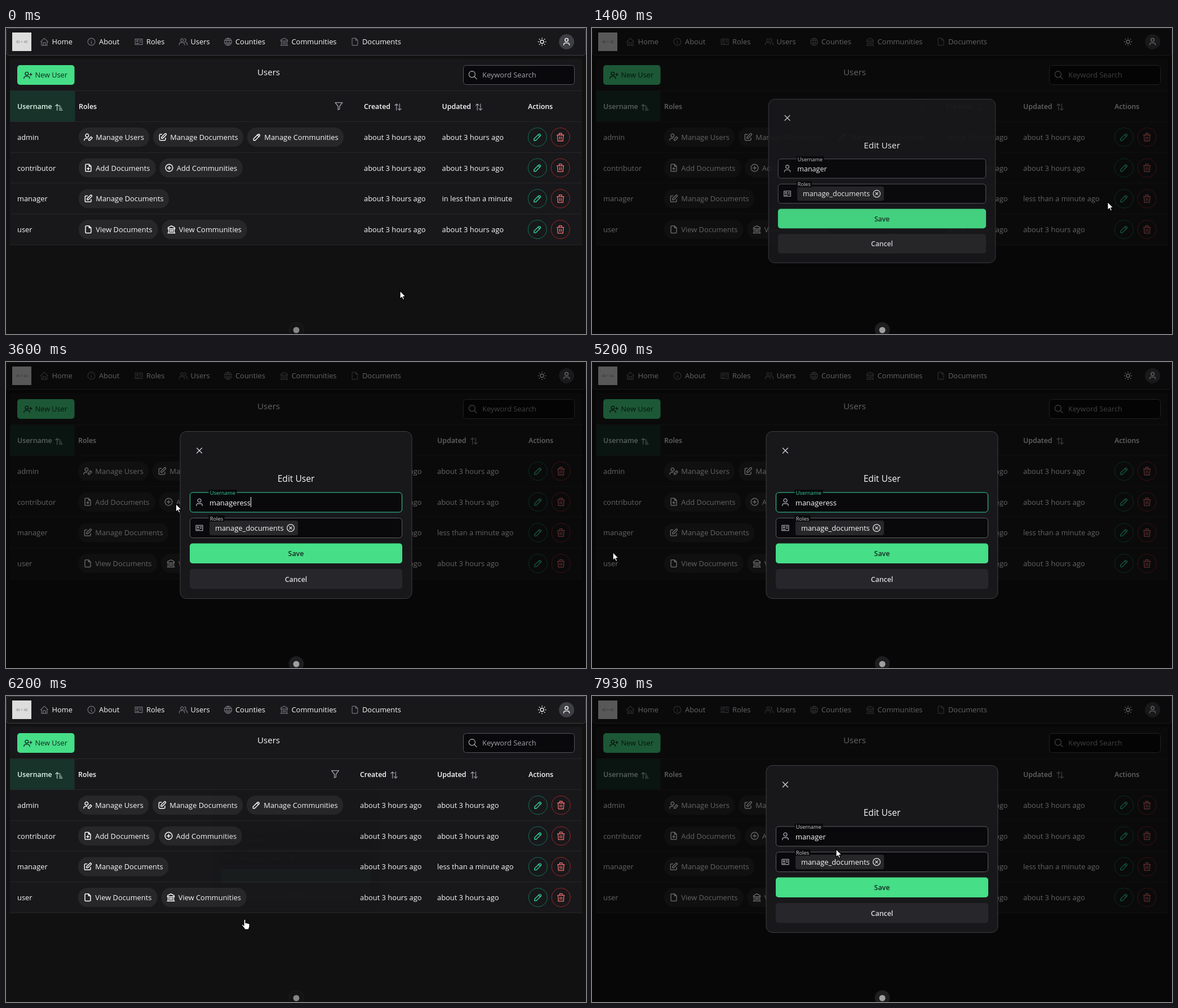
An HTML page with a canvas that plays this animation: 1029 px wide and 544 px high, repeating every 8 s.

```html
<!DOCTYPE html>
<html lang="en">
<head>
<meta charset="utf-8">
<title>Users</title>
<style>
html, body { margin: 0; width: 100%; height: 100%; overflow: hidden; background: #111; }
canvas { display: block; width: 1029px; height: 544px; }
</style>
</head>
<body>
<canvas id="stage"></canvas>
<script>
const W = 1029, H = 544, LOOP = 8000;
const canvas = document.getElementById('stage');
const dpr = window.devicePixelRatio || 1;
canvas.width = W * dpr;
canvas.height = H * dpr;
const ctx = canvas.getContext('2d');

const GREEN = '#46de87', MINT = '#34d399', WHITE = '#fafafa', MUTED = '#a1a1aa';
const PANEL = '#18181b', LINE = '#27272a', EDGE = '#3f3f46', FIELD = '#09090b';

// Outline icons on a 24-unit grid
const ring = (x, y, r) => `M${x - r} ${y}a${r} ${r} 0 1 0 ${2 * r} 0a${r} ${r} 0 1 0 ${-2 * r} 0`;
const sheet = 'M14 3v5h5M17 21H7a2 2 0 0 1-2-2V5a2 2 0 0 1 2-2h7l5 5v11a2 2 0 0 1-2 2z';
const icons = {
  home: 'M5 12H3l9-9 9 9h-2M5 12v9h14v-9M9 21v-7h6v7',
  info: ring(12, 12, 9) + 'M12 8v.5M11 12h1v4h1',
  card: 'M3 5h18v14H3z' + ring(8.5, 10, 2) + 'M14 9h4M14 13h4M6 16h6',
  group: ring(9, 8, 3.5) + 'M2 20v-2a4 4 0 0 1 4-4h5a4 4 0 0 1 4 4v2M15 4.500a3.500 3.500 0 0 1 0 7M22 20v-2a4 4 0 0 0-4-4',
  globe: ring(12, 12, 9) + 'M3.600 9h17M3.600 15h17M11.500 3a17 17 0 0 0 0 18M12.500 3a17 17 0 0 1 0 18',
  bank: 'M3 21h18M3 10h18M4 7l8-4 8 4v3M4 10V7M5 10v11M19 10v11M9 13v5M12 13v5M15 13v5',
  file: sheet,
  fileAdd: sheet + 'M12 11v6M9 14h6',
  sun: ring(12, 12, 4) + 'M3 12h1M12 3v1M20 12h1M12 20v1M5.600 5.600l.7.7M18.400 5.600l-.7.7M17.700 17.700l.7.7M6.300 17.700l-.7.7',
  user: ring(12, 7.5, 4) + 'M5 20v-1a4 4 0 0 1 4-4h6a4 4 0 0 1 4 4v1',
  userAdd: ring(9, 8, 4) + 'M2 20v-1a4 4 0 0 1 4-4h6a4 4 0 0 1 4 4v1M16 10h6M19 7v6',
  userEdit: ring(9, 8, 4) + 'M2 20v-1a4 4 0 0 1 4-4h4M13 20v-3l6-6 3 3-6 6z',
  pencil: 'M4 20h4L18.500 9.500a2.800 2.800 0 1 0-4-4L4 16zM13.500 6.500l4 4',
  edit: 'M10 5H6a2 2 0 0 0-2 2v11a2 2 0 0 0 2 2h11a2 2 0 0 0 2-2v-4M20.400 6.600a2.100 2.100 0 0 0-3-3L9 12v3h3z',
  plus: ring(12, 12, 9) + 'M8 12h8M12 8v8',
  trash: 'M4 7h16M10 11v6M14 11v6M5 7l1 14h12l1-14M9 7V3h6v4',
  search: ring(10.5, 10.5, 7) + 'M21 21l-5.500-5.500',
  funnel: 'M3 3h18l-7 9v7l-4 2v-9z',
  sort: 'M8 20V4M4 8l4-4 4 4M16 4v16M12 16l4 4 4-4',
  sortUp: 'M7 21V5M3 9l4-4 4 4M13 8h2M13 12h4M13 16h6M13 20h8',
  cross: 'M6 6l12 12M18 6L6 18',
  clear: ring(12, 12, 9) + 'M9 9l6 6M15 9l-6 6'
};
for (const k in icons) icons[k] = new Path2D(icons[k]);

const arrow = new Path2D('M0 0V14.500L3.300 11.600 5.400 16.400 7.800 15.300 5.700 10.700H10.200z');
const hand = new Path2D('M-1.500 1.500a1.500 1.500 0 0 1 3 0V6.500q1.400-1 2.600.4 1.500-.9 2.500.6 2-.4 2 1.500V13q-.2 2-1.200 3v2H-.5v-1.500Q-3 13.500-5 10.500q-.5-2 1.300-1.800L-1.500 11z');

const clamp = v => Math.max(0, Math.min(1, v));
const ramp = (t, a, b) => clamp((t - a) / (b - a));
const mix = (a, b, p) => a + (b - a) * p;

// cubic-bezier(0, 0, .2, 1)
function easeOut(x) {
  let lo = 0, hi = 1;
  for (let i = 0; i < 20; i++) {
    const s = (lo + hi) / 2;
    if (0.6 * s * s * (1 - s) + s * s * s < x) lo = s; else hi = s;
  }
  return lo * lo * (3 - 2 * lo);
}

function text(s, x, y, size = 12.86, color = WHITE, weight = 400, align = 'left') {
  ctx.font = `${weight} ${size}px "Open Sans", "Noto Sans", sans-serif`;
  ctx.textAlign = align;
  ctx.fillStyle = color;
  ctx.fillText(s, x, y);
}

function icon(name, x, y, size, color, width = 1.3) {
  const k = size / 24;
  ctx.save();
  ctx.translate(x - size / 2, y - size / 2);
  ctx.scale(k, k);
  ctx.strokeStyle = color;
  ctx.lineWidth = width / k;
  ctx.lineCap = ctx.lineJoin = 'round';
  ctx.stroke(icons[name]);
  ctx.restore();
}

function box(x, y, w, h, r, fill, stroke) {
  ctx.beginPath();
  ctx.roundRect(x, y, w, h, r);
  if (fill) { ctx.fillStyle = fill; ctx.fill(); }
  if (stroke) { ctx.strokeStyle = stroke; ctx.lineWidth = 1; ctx.stroke(); }
}

function disc(x, y, r, fill, stroke) {
  box(x - r, y - r, 2 * r, 2 * r, r, fill, stroke);
}

const nav = [
  ['home', 68, 'Home', 81.5], ['info', 151.5, 'About', 165], ['card', 235.5, 'Roles', 249],
  ['group', 314.5, 'Users', 327.5], ['globe', 394, 'Counties', 407],
  ['bank', 493.5, 'Communities', 506.5], ['file', 619, 'Documents', 632]
];

// Each chip: icon, label, width
const rows = [
  ['admin', [['userEdit', 'Manage Users', 125], ['edit', 'Manage Documents', 160], ['pencil', 'Manage Communities', 171]]],
  ['contributor', [['fileAdd', 'Add Documents', 136.5], ['plus', 'Add Communities', 147]]],
  ['manager', [['edit', 'Manage Documents', 160]]],
  ['user', [['file', 'View Documents', 140.5], ['bank', 'View Communities', 151]]]
];

function drawNav() {
  box(0.5, 0.5, 1028, 48, 5, PANEL, EDGE);
  ctx.fillStyle = '#dddddd';
  ctx.fillRect(11, 8, 34, 33);
  text('40 × 40', 28, 27, 6.3, '#999', 600, 'center');
  for (const [name, ix, label, tx] of nav) {
    icon(name, ix, 24.5, 17, '#71717a', 1.2);
    text(label, tx, 29.3);
  }
  icon('sun', 951, 24.5, 18, WHITE);
  disc(994.5, 24.5, 13.5, EDGE);
  icon('user', 994.5, 24.5, 17, WHITE, 1.4);
}

function drawTable(fresh, hover) {
  const col = fresh
    ? { roles: 128, funnel: 584, made: 628, upd: 765, act: 927 }
    : { roles: 129, funnel: 590.5, made: 635, upd: 773.5, act: 926 };
  ctx.fillStyle = PANEL;
  ctx.fillRect(7, 55, 1015, 330);

  box(20, 66, 101.5, 35, 5, GREEN);
  icon('userAdd', 39, 84, 17, '#15281e', 1.4);
  text('New User', 51.5, 88.3, 12.75, '#15281e', 500);
  text('Users', 466, 84, 15.1, WHITE, 400, 'center');
  box(811.5, 66.5, 197, 34, 5, FIELD, '#52525b');
  icon('search', 828, 83.5, 19, MUTED);
  text('Keyword Search', 845, 88.3, 12.86, MUTED);

  ctx.fillStyle = '#18332a';
  ctx.fillRect(7, 112, col.roles - 14 + 0.5, 54);
  const head = (s, x) => text(s, x, 144.2, 12.4, WHITE, 600);
  text('Username', 20, 144.2, 12.4, '#dff5ea', 600);
  icon('sortUp', 94, 140.5, 16, '#c3dbd0', 1.2);
  head('Roles', col.roles);
  icon('funnel', col.funnel, 139, 17, MUTED);
  head('Created', col.made);
  icon('sort', col.made + 60.5, 140.5, 17, MUTED, 1.2);
  head('Updated', col.upd);
  icon('sort', col.upd + 65.5, 140.5, 17, MUTED, 1.2);
  head('Actions', col.act);

  ctx.fillStyle = LINE;
  for (let i = 0; i < 6; i++) ctx.fillRect(7, Math.round(111 + i * 54.8), 1015, 1);

  rows.forEach(([name, chips], i) => {
    const y = 194 + i * 54.7, base = y + 4.8;
    text(name, 20, base);
    let x = col.roles;
    for (const [glyph, label, w] of chips) {
      box(x, y - 17, w, 34, 16, LINE);
      icon(glyph, x + 17, y, 17, WHITE, 1.5);
      text(label, x + 30.3, base);
      x += w + 7;
    }
    text('about 3 hours ago', col.made, base);
    const recent = fresh ? 'less than a minute ago' : 'in less than a minute';
    text(i === 2 ? recent : 'about 3 hours ago', col.upd, base);
    const bx = col.act + 16.8;
    disc(bx, y, 16.5, i === 2 ? `rgba(52,211,153,${0.16 * hover})` : null, '#12734f');
    icon('pencil', bx, y, 18, MINT, 1.4);
    disc(bx + 40.8, y, 16.5, null, '#a12626');
    icon('trash', bx + 40.8, y, 18, '#f87171', 1.3);
  });
}

function drawLabel(s, y, w, color) {
  ctx.fillStyle = FIELD;
  ctx.fillRect(359.5, y - 5, w, 11);
  text(s, 361.7, y + 4, 9.35, color);
}

function drawDialog(t, show) {
  if (show <= 0) return;
  const reopened = t > 7000;
  const focus = reopened ? 0 : ramp(t, 2070, 2270) - ramp(t, 5570, 5670);
  const tint = (a, b) => `rgb(${a.map((v, i) => Math.round(mix(v, b[i], focus)))})`;
  const mint = [52, 211, 153];
  const k = mix(0.7, 1, show);

  ctx.save();
  ctx.globalAlpha = show;
  ctx.translate(514.5, 272);
  ctx.scale(k, k);
  ctx.translate(-514.5, -272);

  box(309, 123.5, 411, 297, 11, PANEL, EDGE);
  icon('cross', 343, 157.5, 18, '#d4d4d8', 1.3);
  text('Edit User', 514.5, 213, 15.6, WHITE, 400, 'center');

  box(326.5, 232, 376, 35, 5, FIELD, tint([90, 90, 98], mint));
  icon('user', 343, 249.5, 18, MUTED, 1.4);
  drawLabel('Username', 232, 50, tint([212, 212, 216], mint));
  const typed = reopened ? 0 : [2870, 3070, 3270].filter(m => t >= m).length;
  const value = 'manager' + 'ess'.slice(0, typed);
  text(value, 361, 254.6);
  const blink = t < 2870 ? t < 2670 : t < 3270 || Math.floor((t - 3270) / 500) % 2 === 0;
  if (!reopened && t >= 2150 && t < 5570 && blink) {
    const cx = Math.round(361 + ctx.measureText(value).width);
    ctx.fillRect(cx, 240, 1, 18);
  }

  box(326.5, 277.5, 376, 35, 5, FIELD, '#5a5a62');
  icon('card', 343, 295, 16, MUTED, 1.3);
  box(361, 282, 157, 26, 4, LINE);
  drawLabel('Roles', 277.5, 28, '#d4d4d8');
  text('manage_documents', 371, 299.7);
  icon('clear', 505, 295, 17, '#e4e4e7', 1.3);

  box(326, 322.5, 377, 35.5, 5, GREEN);
  text('Save', 514.5, 345.3, 12.4, '#15281e', 600, 'center');
  const hot = reopened ? 0 : ramp(t, 5560, 5650);
  const press = !reopened && t >= 5930 ? 14 : 0;
  const shade = Math.round(mix(39, 63, hot)) + press;
  box(326, 368, 377, 35.5, 5, `rgb(${shade},${shade},${shade + 4})`);
  text('Cancel', 514.5, 390.6, 12.4, '#d9d9de', 600, 'center');
  ctx.restore();
}

// Pointer way-points: time, x, y
const path = [
  [0, 699, 467], [70, 699, 467], [870, 945, 345], [930, 944, 309], [1200, 944, 309],
  [1400, 915, 309], [2000, 560, 250], [2130, 556, 250], [2330, 531, 416], [2870, 531, 416],
  [3270, 530, 300], [3600, 302, 252], [4070, 27, 315], [4500, 20, 320], [4930, 24, 321],
  [5200, 37, 338], [5670, 423.5, 397], [6470, 423.5, 397], [7210, 944, 308],
  [7290, 944, 308], [7930, 433, 272], [8000, 433, 272]
];

function slope(i, c) {
  if (i < 1 || i > path.length - 2) return 0;
  const [p, q, r] = [path[i - 1], path[i], path[i + 1]];
  const a = (q[c] - p[c]) / (q[0] - p[0]), b = (r[c] - q[c]) / (r[0] - q[0]);
  return a * b > 0 ? 2 * a * b / (a + b) : 0;
}

function pointerAt(t) {
  let i = 0;
  while (i < path.length - 2 && path[i + 1][0] <= t) i++;
  const a = path[i], b = path[i + 1], d = b[0] - a[0], s = (t - a[0]) / d;
  const e = s * s * (3 - 2 * s);
  return [1, 2].map(c => mix(a[c], b[c], e)
    + d * s * (1 - s) * ((1 - s) * slope(i, c) - s * slope(i + 1, c)));
}

function drawPointer(t) {
  if (t >= 2870 && t < 3270) return;
  const [x, y] = pointerAt(t);
  const onEdit = (t >= 900 && t < 1200) || (t >= 7150 && t < 7260);
  const onCancel = t >= 5560 && t < 6500;
  const onField = t > 1450 && t < 5600 && x > 326 && x < 703 && y > 232 && y < 267;
  ctx.save();
  ctx.translate(x, y);
  ctx.fillStyle = '#fff';
  if (onField) {
    ctx.fillRect(-0.5, -7, 1, 15);
    ctx.fillRect(-3, -8, 6, 1);
    ctx.fillRect(-3, 8, 6, 1);
  } else {
    const shape = onEdit || onCancel ? hand : arrow;
    ctx.strokeStyle = '#000';
    ctx.lineWidth = 1.2;
    ctx.lineJoin = 'round';
    ctx.fill(shape);
    ctx.stroke(shape);
  }
  ctx.restore();
}

function draw(t) {
  ctx.setTransform(dpr, 0, 0, dpr, 0, 0);
  ctx.fillStyle = '#111111';
  ctx.fillRect(0, 0, W, H);

  const hover = ramp(t, 850, 930) - ramp(t, 1250, 1400) + ramp(t, 7130, 7230) - ramp(t, 7290, 7440);
  drawNav();
  drawTable(t >= 1200, hover);

  const dim = ramp(t, 1190, 1340) - ramp(t, 6040, 6190) + ramp(t, 7260, 7410);
  ctx.fillStyle = `rgba(0,0,0,${0.6 * dim})`;
  ctx.fillRect(0, 0, W, H);

  const show = easeOut(ramp(t, 1302, 1452)) - easeOut(ramp(t, 6084, 6234)) + easeOut(ramp(t, 7370, 7520));
  drawDialog(t, show);

  disc(515, 536.5, 13, dim > 0.5 ? '#1e1e20' : '#141415', '#1f1f22');
  disc(515, 537, 5.5, dim > 0.5 ? '#a0a0a0' : '#858585');
  drawPointer(t);
}

const start = performance.now();
function tick(now) {
  draw(Math.max(0, now - start) % LOOP);
  requestAnimationFrame(tick);
}
draw(0);
requestAnimationFrame(tick);
</script>
</body>
</html>
```
